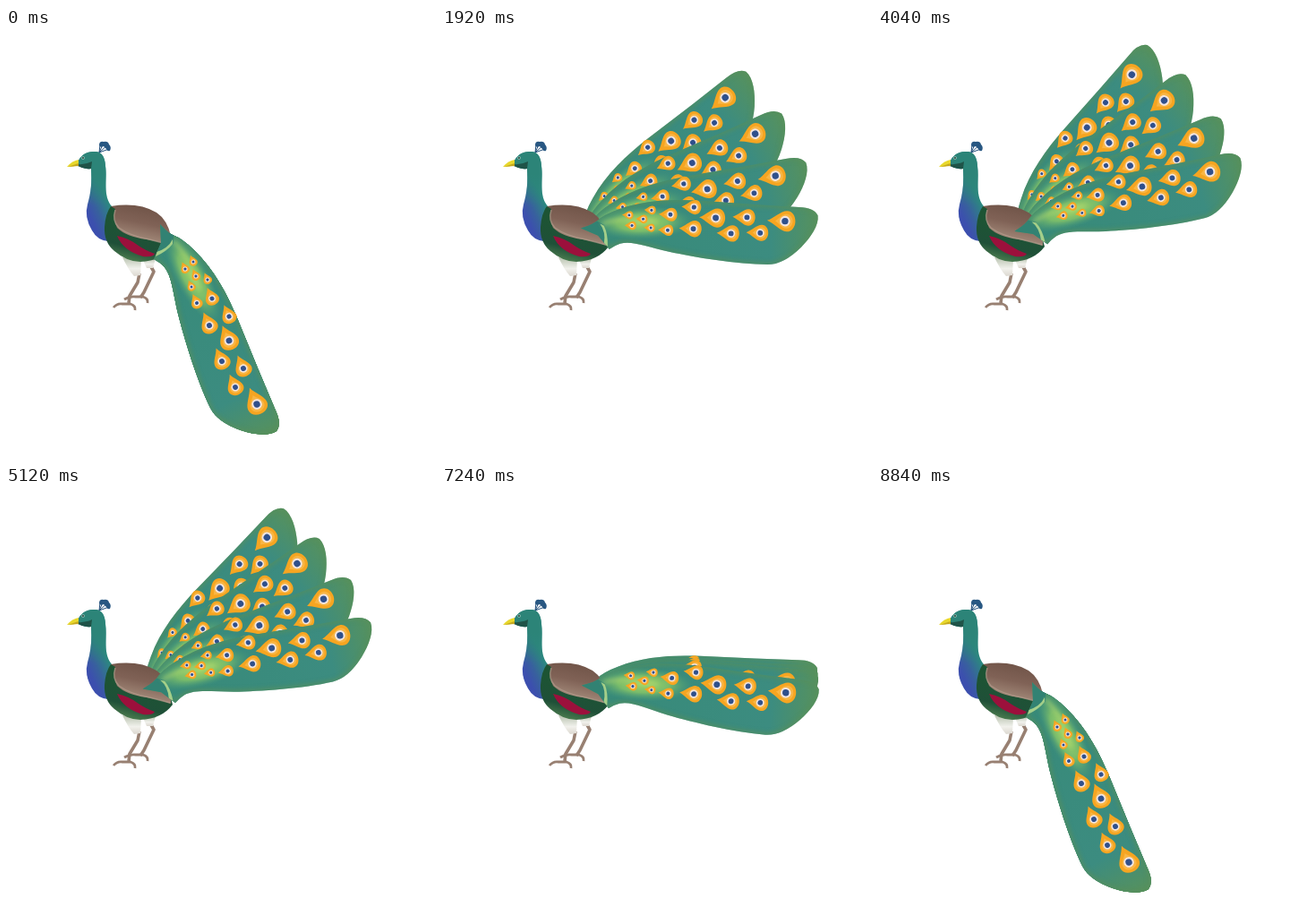
Animation, 480 px wide and 480 px high, one loop 9.08 s. Source, as an HTML page:

```html
<!DOCTYPE html>
<html lang="en">
<head>
<meta charset="utf-8">
<title>Peacock</title>
<style>
html, body { margin: 0; width: 100%; height: 100%; overflow: hidden; background: #fff; }
svg { display: block; width: 100vw; height: 100vh; }
</style>
</head>
<body>
<svg viewBox="0 0 480 480">
  <defs>
    <linearGradient id="plume" gradientUnits="userSpaceOnUse" x1="180" y1="230" x2="288" y2="454">
      <stop offset="0" stop-color="#378a78"/>
      <stop offset=".8" stop-color="#3c8c80"/>
      <stop offset="1" stop-color="#55915f"/>
    </linearGradient>
    <radialGradient id="glow">
      <stop offset="0" stop-color="#a6d668"/>
      <stop offset=".5" stop-color="#84c468" stop-opacity=".85"/>
      <stop offset="1" stop-color="#4c9c78" stop-opacity="0"/>
    </radialGradient>
    <linearGradient id="neck" gradientUnits="userSpaceOnUse" x1="91" y1="205" x2="114" y2="194">
      <stop offset="0" stop-color="#3c4fae"/>
      <stop offset=".4" stop-color="#38609e"/>
      <stop offset="1" stop-color="#2c8880"/>
    </linearGradient>
    <linearGradient id="headTint" x1="0" y1="0" x2="0" y2="1">
      <stop offset="0" stop-color="#2c8478"/>
      <stop offset=".25" stop-color="#2c8478"/>
      <stop offset=".6" stop-color="#2c8478" stop-opacity="0"/>
    </linearGradient>
    <linearGradient id="back" gradientUnits="userSpaceOnUse" x1="150" y1="197" x2="142" y2="236">
      <stop offset="0" stop-color="#705448"/>
      <stop offset=".5" stop-color="#806256"/>
      <stop offset="1" stop-color="#a38a7a"/>
    </linearGradient>
    <linearGradient id="wing" gradientUnits="userSpaceOnUse" x1="150" y1="222" x2="140" y2="262">
      <stop offset="0" stop-color="#1d5434"/>
      <stop offset=".6" stop-color="#1f5038"/>
      <stop offset="1" stop-color="#4f7f50"/>
    </linearGradient>
    <linearGradient id="thigh" x1="0" y1="0" x2="0" y2="1">
      <stop offset="0" stop-color="#b9c3b0"/>
      <stop offset=".6" stop-color="#f1f1ec"/>
      <stop offset="1" stop-color="#dcd8d0"/>
    </linearGradient>
    <filter id="soft" x="-20%" y="-20%" width="140%" height="140%"><feGaussianBlur stdDeviation="2.5"/></filter>

    <path id="vane" d="M172 219C176 223 180 228 186 231Q197 235 210 248C232 269 247 297 259 326L282 382L301 427Q308 442 302 450C293 456 277 454 262 449Q236 440 228 424C213 393 199 347 192 319C186 293 185 276 176 266Q171 261 165 258L173 240Z"/>
    <clipPath id="vaneClip"><use href="#vane"/></clipPath>

    <g id="eye">
      <path d="M0-20C3-12 11.5-5 11.5 2C11.5 8 6 11.5 0 11.5S-11.5 8-11.5 2C-11.5-5-3-12 0-20Z" fill="#f6a521"/>
      <path d="M0-11C2-7 8-4 8 1.5C8 6 4 8.5 0 8.5S-8 6-8 1.5C-8-4-2-7 0-11Z" fill="#f9b645"/>
      <circle r="5.8" fill="#f2e6e2"/>
      <circle r="3.7" fill="#30508c"/>
    </g>

    <g id="feather">
      <use href="#vane" fill="url(#plume)"/>
      <g clip-path="url(#vaneClip)">
        <use href="#vane" fill="none" stroke="#578f5c" stroke-width="5" opacity=".75" filter="url(#soft)"/>
        <ellipse rx="57" ry="19" transform="translate(208 278) rotate(62)" fill="url(#glow)"/>
        <path d="M172 219L187 231L187 241L168 252L173 240Z" fill="#328273"/>
        <path d="M167 255Q180 249 186 241L186 236Q181 246 168 250Z" fill="#a4cf8a"/>
        <path d="M187 238Q204 254 216 292" fill="none" stroke="#b5da70" stroke-width="4" opacity=".6" filter="url(#soft)"/>
      </g>
      <g id="eyes"></g>
    </g>
  </defs>

  <g id="fan"></g>

  <g id="bird">
    <g fill="none" stroke="#988072" stroke-width="3.6" stroke-linejoin="round">
      <path d="M161 265L165 272L154 295L150 301"/>
      <path d="M149 274L147 284L138 299L137 307"/>
      <path d="M120 312Q124 307 130 308L139 308Q145 310 144 315M132 303Q138 299 145 300L153 300Q159 302 158 307" stroke-width="2.8"/>
    </g>
    <path d="M153 259L167 257L164 268L157 268Z" fill="url(#thigh)"/>
    <path d="M130 256L151 258L150 276L143 277Q136 269 130 256Z" fill="url(#thigh)"/>

    <g fill="none" stroke="#24507c" stroke-width="1">
      <path d="M104 139L105 130M104 139L109 128M104 139L114 130M104 139L115 135"/>
    </g>
    <path d="M104 131Q104 126 109 127Q114 126 115 130Q118 133 116 137Q113 138 112 135L109 132L106 133Z" fill="#285782"/>

    <g id="neckShape">
      <path d="M80 150Q85 138 98 138Q110 137 111 154C113 170 108 187 118 199L122 215L114 238Q102 237 96 226Q87 211 91 197C95 184 96 171 95 157Q87 158 80 153Z" fill="url(#neck)"/>
      <path d="M80 150Q85 138 98 138Q110 137 111 154C113 170 108 187 118 199L122 215L114 238Q102 237 96 226Q87 211 91 197C95 184 96 171 95 157Q87 158 80 153Z" fill="url(#headTint)"/>
    </g>
    <path d="M80 152Q88 153 96 149L95 157Q87 158 80 154Z" fill="#1f5348"/>
    <path d="M68 155Q74 148 81 147L81 153Q75 155 68 155Z" fill="#e8d82c"/>
    <path d="M69 155L81 151L81 154Z" fill="#c5a81e"/>
    <circle cx="86" cy="145" r="1.8" fill="#9dc9bc"/>
    <circle cx="86" cy="145" r=".9" fill="#16322c"/>

    <path d="M117 199Q111 207 110 222Q109 239 121 249Q135 261 150 261Q174 260 186 244L180 222L140 202Z" fill="url(#wing)"/>
    <path d="M117 199Q148 194 168 206Q180 214 184 232L184 243Q171 238 157 236Q134 233 124 223Q119 213 122 202Z" fill="url(#back)"/>
    <path d="M122 203Q118 215 126 223Q138 232 160 236L183 242" fill="none" stroke="#b29c8c" stroke-width="1.5" opacity=".7"/>
    <path d="M124 232Q138 235 148 243Q155 248 166 252Q164 256 153 255Q131 249 124 232Z" fill="#9c103c"/>
  </g>

  <use id="front" href="#feather"/>
</svg>

<script>
const LOOP = 9080, STEP = 40, LAST = 8840;
const PIVOT = "167 235", REST = 58.6;
const $ = id => document.getElementById(id);

function add(parent, href, transform = "") {
  const node = document.createElementNS("http://www.w3.org/2000/svg", "use");
  node.setAttribute("href", href);
  node.setAttribute("transform", transform);
  parent.append(node);
  return node;
}

// Eye spots: x, y, size
[
  [209, 261, .4], [200, 269, .42], [212, 277, .42], [225, 281, .42],
  [207, 289, .4], [230, 302, .66], [213, 307, .55], [249, 322, .7],
  [227, 332, .8], [249, 349, .92], [241, 372, .8], [265, 380, .8],
  [256, 401, .78], [280, 420, 1]
].forEach(([x, y, s]) => add($("eyes"), "#eye", `translate(${x} ${y}) rotate(-24) scale(${s})`));

// Key times and the direction of each feather, front to back, in degrees
const times = [0, 920, 1120, 1920, 2760, 3120, 3680, 4560, 5120, 5560, 6440, 7240, 8280, LAST];
const angles = [
  [REST, 10.5, 7.8, -5.1, -11.8, -14.6, -19, -20.8, -18.3, -16.2, -8.5, -1.1, 40.3, REST],
  [REST, 2, -3.9, -18.8, -24.3, -26.4, -29.8, -32, -30.1, -27.5, -14, -4, 40.3, REST],
  [REST, -7, -18, -32.6, -38.6, -40.9, -44.3, -46, -43.2, -40, -20, -5.2, 40.3, REST],
  [REST, -8, -18.8, -46.5, -50, -51.3, -56.4, -58.3, -55, -52.4, -26.7, -6.5, 40.3, REST]
];

// Monotone cubic curve through the keys
function curve(values) {
  const slope = i => (values[i + 1] - values[i]) / (times[i + 1] - times[i]);
  const tangents = values.map((_, i) => {
    if (i === 0) return slope(0);
    if (i === values.length - 1) return slope(i - 1);
    const a = slope(i - 1), b = slope(i);
    return a * b > 0 ? 2 * a * b / (a + b) : 0;
  });
  return t => {
    let i = 0;
    while (i < times.length - 2 && t >= times[i + 1]) i++;
    const h = times[i + 1] - times[i], u = (t - times[i]) / h, v = 1 - u;
    return v * v * ((1 + 2 * u) * values[i] + u * h * tangents[i]) +
           u * u * ((1 + 2 * v) * values[i + 1] - v * h * tangents[i + 1]);
  };
}

const curves = angles.map(curve);
const behind = [3, 2, 1].map(() => add($("fan"), "#feather"));
const feathers = [$("front"), ...behind.reverse()];

function draw(now) {
  const t = Math.min(Math.floor(now % LOOP / STEP) * STEP, LAST);
  feathers.forEach((feather, i) =>
    feather.setAttribute("transform", `rotate(${curves[i](t) - REST} ${PIVOT})`));
}

const start = performance.now();
function tick() {
  draw(performance.now() - start);
  requestAnimationFrame(tick);
}
tick();
</script>
</body>
</html>
```
